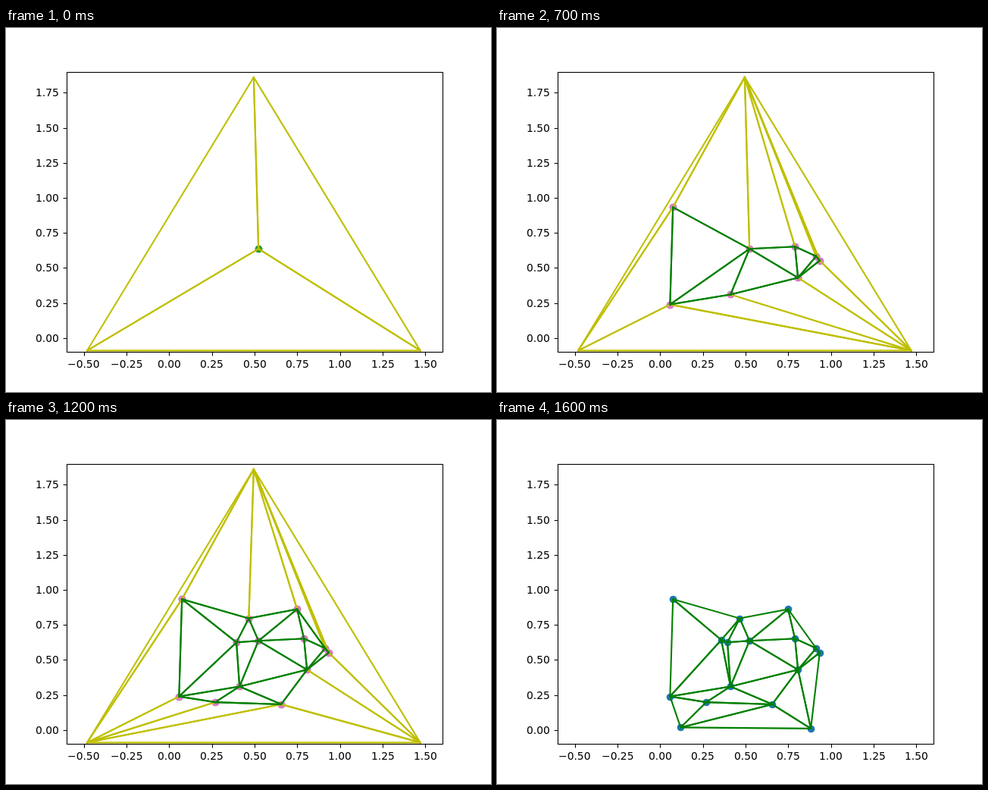
An HTML page with a canvas for the animation above (1700 ms loop, 640 by 480 pixels).

```html
<!DOCTYPE html>
<html lang="en">
<head>
<meta charset="utf-8">
<title>Incremental triangulation</title>
<style>
html, body { margin: 0; width: 640px; height: 480px; overflow: hidden; background: #fff; }
canvas { display: block; }
</style>
</head>
<body>
<canvas id="plot" width="640" height="480"></canvas>
<script>
const ctx = document.getElementById('plot').getContext('2d');
const STEP = 100;
const CYCLE = ['#1f77b4', '#2ca02c', '#9467bd', '#e377c2', '#bcbd22'];

// The scattered points in order of insertion; every edge is computed from them.
const sites = [
  [0.523, 0.636], [0.913, 0.583], [0.934, 0.552], [0.807, 0.430],
  [0.058, 0.239], [0.075, 0.933], [0.789, 0.652], [0.412, 0.310],
  [0.749, 0.862], [0.394, 0.625], [0.270, 0.198], [0.466, 0.796],
  [0.656, 0.183], [0.120, 0.018], [0.358, 0.642], [0.882, 0.010]
];

// Enclosing triangle, as wide as it is high.
const LEFT = -0.48, BASE = -0.09, SIDE = 1.95;
const hull = [[LEFT, BASE], [LEFT + SIDE, BASE], [LEFT + SIDE / 2, BASE + SIDE]];
const pts = [...hull, ...sites];
const isHull = i => i < hull.length;

const px = x => 80 + (x + 0.6) * 496 / 2.2;
const py = y => 427.2 - (y + 0.1) * 369.6 / 2;
const snap = v => Math.floor(v + 0.5) + 0.5;

function inCircle(tri, [x, y]) {
  const [[ax, ay], [bx, by], [cx, cy]] = tri.map(i => [pts[i][0] - x, pts[i][1] - y]);
  const a = ax * ax + ay * ay, b = bx * bx + by * by, c = cx * cx + cy * cy;
  const det = a * (bx * cy - by * cx) - b * (ax * cy - ay * cx) + c * (ax * by - ay * bx);
  const turn = (bx - ax) * (cy - ay) - (by - ay) * (cx - ax);
  return det * turn > 0;
}

const edgesOf = ([a, b, c]) => [[a, b], [b, c], [c, a]];

// Bowyer-Watson: remove the cavity around point n and fan its border to n.
function insert(tris, n) {
  const bad = tris.filter(t => inCircle(t, pts[n]));
  const edges = bad.flatMap(edgesOf);
  const border = edges.filter(([a, b]) => !edges.some(([c, d]) => a === d && b === c));
  return tris.filter(t => !bad.includes(t)).concat(border.map(([a, b]) => [a, b, n]));
}

const steps = [];
let mesh = [[0, 1, 2]];
sites.forEach((_, i) => steps.push(mesh = insert(mesh, i + hull.length)));
steps.push(mesh.filter(t => !t.some(isHull)));

function line(x1, y1, x2, y2) {
  ctx.beginPath();
  ctx.moveTo(x1, y1);
  ctx.lineTo(x2, y2);
  ctx.stroke();
}

function dots(count, color) {
  ctx.fillStyle = color;
  for (const [x, y] of sites.slice(0, count)) {
    ctx.beginPath();
    ctx.arc(snap(px(x)), snap(py(y)), 4.86, 0, 2 * Math.PI);
    ctx.fill();
  }
}

function drawEdges(edges, color) {
  ctx.strokeStyle = color;
  ctx.lineWidth = 2.083;
  ctx.lineCap = 'square';
  for (const [a, b] of edges) {
    line(px(pts[a][0]), py(pts[a][1]), px(pts[b][0]), py(pts[b][1]));
  }
}

// Text starts on a whole pixel; align is the part of its width left of x.
function label(value, x, y, align) {
  const text = value.toFixed(2).replace('-', '\u2212');
  ctx.fillText(text, Math.round(x - align * ctx.measureText(text).width), y);
}

function drawAxes() {
  ctx.strokeStyle = ctx.fillStyle = '#000';
  ctx.lineWidth = 1.1;
  ctx.lineCap = 'butt';
  ctx.font = '13.889px "DejaVu Sans", sans-serif';
  for (let v = -0.5; v <= 1.5; v += 0.25) {
    const x = snap(px(v));
    line(x, 427.5, x, 432.4);
    label(v, px(v), 448, 0.5);
  }
  for (let v = 0; v <= 1.75; v += 0.25) {
    const y = snap(py(v));
    line(75.6, y, 80.5, y);
    label(v, 70.3, Math.round(py(v) + 5), 1);
  }
  ctx.strokeRect(80.5, 58.5, 496, 369);
}

function draw(k) {
  ctx.fillStyle = '#fff';
  ctx.fillRect(0, 0, 640, 480);
  dots(k + 1, CYCLE[0]);
  if (k < sites.length) dots(k + 1, CYCLE[(k + 1) % CYCLE.length]);
  // Shared edges are stroked once per triangle, so they look heavier.
  const edges = steps[k].flatMap(edgesOf);
  drawEdges(edges.filter(e => e.some(isHull)), '#bfbf00');
  drawEdges(edges.filter(e => !e.some(isHull)), '#008000');
  drawAxes();
}

let shown = -1;
function tick() {
  const k = Math.floor(performance.now() / STEP) % steps.length;
  if (k !== shown) draw(shown = k);
  requestAnimationFrame(tick);
}
tick();
</script>
</body>
</html>
```
